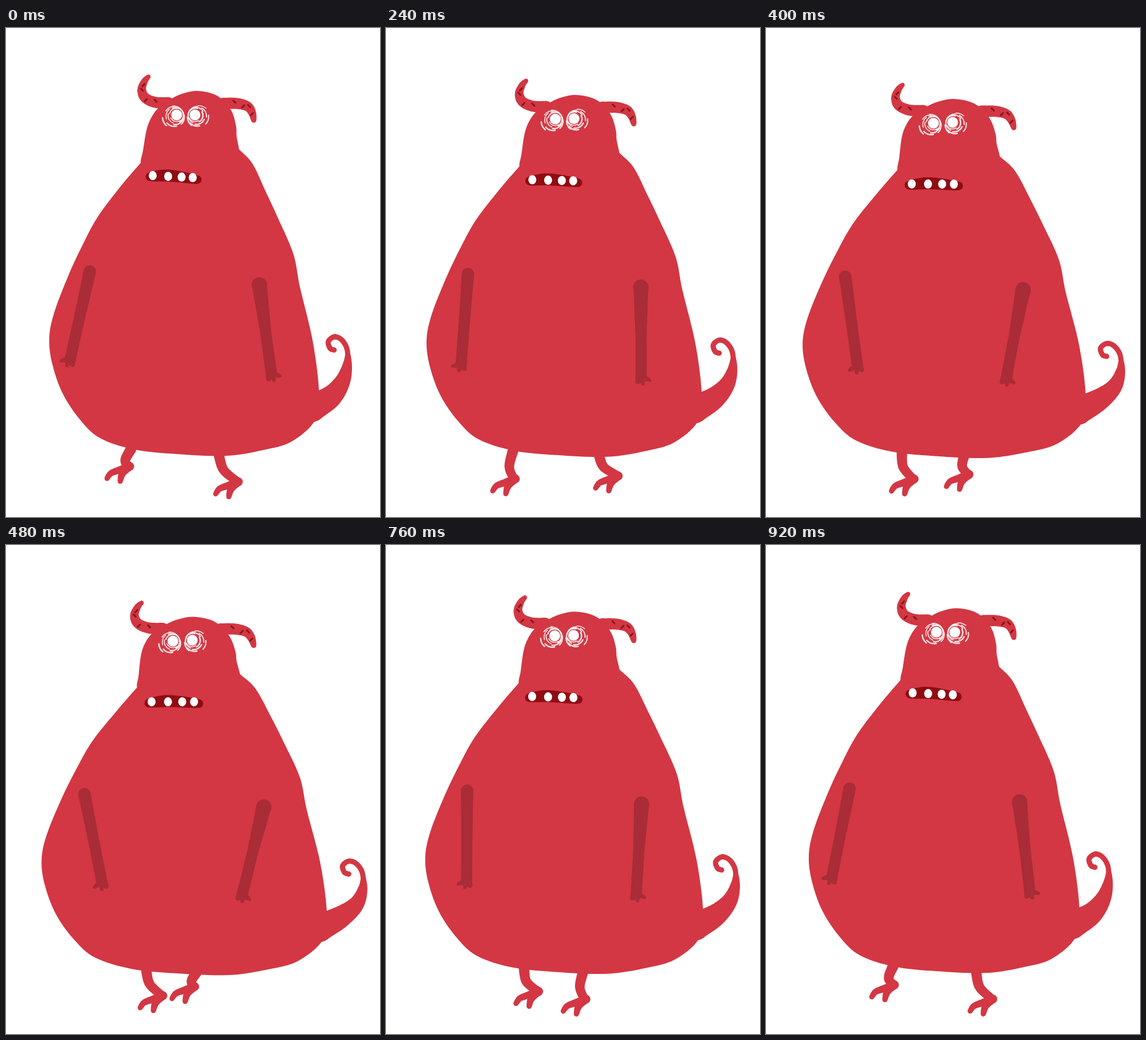
These frames come from a looping animation (655 by 855 pixels, 960 ms). An HTML page with a canvas:

```html
<!DOCTYPE html>
<html lang="en">
<head>
<meta charset="utf-8">
<title>Walking monster</title>
<style>
  html, body { margin: 0; width: 100%; height: 100%; overflow: hidden; background: #fff; }
  canvas { display: block; width: 655px; height: 855px; }
</style>
</head>
<body>
<canvas id="stage" width="655" height="855"></canvas>
<script>
const ctx = document.getElementById('stage').getContext('2d');
const LOOP = 960, STEP = 40, TURN = 2 * Math.PI;
const RED = '#d33743', ARM = '#a92c36', MOUTH = '#8f0c13', MARK = '#86151d';

// Key points of the standing pose
const BODY = [
  [385,188], [408,212], [432,238], [456,289], [476,332], [503,395], [515,455], [537,548],
  [548,638], [541,686], [500,723], [450,738], [385,748], [300,745], [225,737], [165,717],
  [130,685], [100,640], [82,590], [76,545], [84,500], [109,434], [135,378], [161,330],
  [200,278], [236,236], [262,208]
];
const HEAD = [
  [335,110], [362,115], [380,126], [396,147], [403,172], [404,190], [408,212], [410,236],
  [400,262], [320,270], [242,258], [236,236], [240,215], [246,180], [254,158], [268,139],
  [293,122], [312,114]
];
const TAIL = [
  [535,664], [568,645], [588,619], [597,590], [597,563], [588,546], [575,540], [564,548],
  [567,560], [574,563]
];
const LEFT_HORN = [[285,131], [262,130], [244,122], [238,108], [243,93], [250,85]];
const RIGHT_HORN = [[380,132], [405,132], [423,137], [431,148], [434,161]];
const LIPS = [[252,260], [285,258], [335,265]];
const TEETH = [257, 284, 307.5, 327];

const clamp = v => Math.min(1, Math.max(0, v));
const mix = (a, b, u) => a + (b - a) * u;
const cycle = (t, lag) => Math.cos(TURN * (t - lag) / LOOP);
const swell = (t, lag) => (1 - cycle(t, lag)) / 2;

// Soft hump around one moment of the loop
function bump(t, peak) {
  const d = (t - peak + 2.5 * LOOP) % LOOP - LOOP / 2;
  return Math.exp(-((d / 110) ** 2));
}

// Point on a smooth open curve, u from 0 to 1
function along(p, u) {
  const n = p.length - 1, i = Math.min(n - 1, Math.floor(u * n)), f = u * n - i;
  const [a, b, c, d] = [i - 1, i, i + 1, i + 2].map(k => p[Math.max(0, Math.min(n, k))]);
  return [0, 1].map(k => b[k] + f / 2 * (c[k] - a[k]
    + f * (2 * a[k] - 5 * b[k] + 4 * c[k] - d[k] + f * (3 * (b[k] - c[k]) + d[k] - a[k]))));
}

// Rounded stroke whose half width changes with u
function worm(p, color, half) {
  const steps = 24 * (p.length - 1);
  ctx.fillStyle = color;
  ctx.beginPath();
  for (let i = 0; i <= steps; i++) {
    const u = i / steps, [x, y] = along(p, u), r = half(u);
    ctx.moveTo(x + r, y);
    ctx.arc(x, y, r, 0, TURN);
  }
  ctx.fill();
}

// Smooth closed outline
function blob(p, color) {
  const n = p.length, get = i => p[(i + n) % n];
  ctx.fillStyle = color;
  ctx.beginPath();
  ctx.moveTo(...p[0]);
  for (let i = 0; i < n; i++) {
    const a = get(i - 1), b = get(i), c = get(i + 1), d = get(i + 2);
    ctx.bezierCurveTo(b[0] + (c[0] - a[0]) / 6, b[1] + (c[1] - a[1]) / 6,
      c[0] - (d[0] - b[0]) / 6, c[1] - (d[1] - b[1]) / 6, c[0], c[1]);
  }
  ctx.fill();
}

function oval(x, y, rx, ry) {
  ctx.beginPath();
  ctx.ellipse(x, y, rx, ry, 0, 0, TURN);
  ctx.fill();
}

// Both legs share one gait, half a loop apart; the lifted foot trails.
function leg(t, home, reach, ground) {
  const lift = bump(t, LOOP / 2);
  const x = home + reach * cycle(t, 120) - 10 * lift;
  const y = ground - 22 * lift - 12 * bump(t, 200);
  const hip = [mix(home, x, .45), ground - 78], ankle = [x + 13, y - 28];
  const knee = [(hip[0] + ankle[0]) / 2 - 7, (hip[1] + ankle[1]) / 2 + 5];
  const at = (dx, dy) => [x + dx, y + dy];
  worm([hip, knee, ankle], RED, u => 9.5 - 2 * u);
  worm([at(17, -26), at(0, -20), at(-16, -14), at(-23, -5)], RED, u => 7.5 - 3 * u);
  worm([at(15, -26), at(4, -14), at(0, 0)], RED, u => 8.5 - 4 * u);
}

// side: -1 has the thumb on the left, 1 on the right
function arm([x, y], degrees, top, side) {
  ctx.save();
  ctx.translate(x, y);
  ctx.rotate(degrees * TURN / 360);
  ctx.scale(side, 1);
  worm([[0, 0], [0, 80], [0, 157]], ARM, u => mix(top, 10, clamp(u * 2)));
  worm([[2, 157], [15, 163]], ARM, u => 6 - 3.5 * u);
  worm([[2, 160], [3, 169]], ARM, u => 5 - 2 * u);
  worm([[-5, 157], [-6, 165]], ARM, () => 4.5);
  ctx.restore();
}

// Pupil in a scribble of arcs that grows and drifts outwards
function eye([x, y], driftX, driftY) {
  ctx.strokeStyle = 'rgba(255,255,255,.85)';
  for (let i = 0; i < 13; i++) {
    const from = i * 2.4 + 1, span = 1.7 - i * .08;
    ctx.lineWidth = 1.7 + i % 3 * .4;
    ctx.beginPath();
    ctx.arc(x + driftX * i, y + driftY * i, 11.5 + i * .7, from, from + span);
    ctx.stroke();
  }
  ctx.fillStyle = '#fff';
  oval(x, y, 9.5, 9.5);
}

function horn(p, tip) {
  worm(p, RED, u => mix(10, tip, u * u));
  ctx.strokeStyle = MARK;
  ctx.lineWidth = 3;
  for (let i = 0; i < 4; i++) {
    const [x, y] = along(p, .2 + .18 * i), side = i % 2 ? 1 : -1;
    ctx.beginPath();
    ctx.moveTo(x - 2, y + side * 5);
    ctx.lineTo(x + 2, y + side);
    ctx.stroke();
  }
}

function draw(t) {
  const wide = swell(t, 45), low = swell(t, 15);
  // The body sinks and spreads while the head leans left.
  const move = ([x, y]) => [
    x + wide * ((x - 310) * .06 - 9 * clamp((270 - y) / 130)),
    y + low * (15.5 - (y - 110) * .018)
  ];
  const face = p => {
    const [x, y] = move(p);
    return [x + 2 * wide, y + low * (1.5 + (295 - p[0]) * .05)];
  };
  const swing = p => {
    const far = clamp((Math.hypot(p[0] - 545, p[1] - 665) - 25) / 50), [x, y] = move(p);
    return [x + 11 * far * wide, y + 5 * far * low];
  };

  ctx.fillStyle = '#fff';
  ctx.fillRect(0, 0, 655, 855);
  ctx.lineCap = 'round';

  leg(t, 357, 47, 820);
  leg(t + LOOP / 2, 234, 34, 814.5);
  worm(TAIL.map(swing), RED, u => Math.max(4.6, 25 - 50 * u));
  blob(BODY.map(move), RED);
  blob(HEAD.map(move), RED);
  horn(LEFT_HORN.map(move), 3.5);
  horn(RIGHT_HORN.map(move), 4.5);

  arm(move([147, 426]), 13.2 - 25 * wide, 11, -1);
  arm(move([443.5, 449]), -8.2 + 22.5 * wide, 13.5, 1);

  eye(face([299, 152]), -.5, .35);
  eye(face([331, 152]), .55, .3);

  worm(LIPS.map(face), MOUTH, u => 7.5 + 3 * Math.sin(Math.PI * u));
  ctx.fillStyle = '#fff';
  for (const x of TEETH) oval(...face([x, 258 + (x - 257) * .05]), 7, 8);
}

const start = performance.now();
function tick() {
  const t = (performance.now() - start) % LOOP;
  draw(Math.floor(t / STEP) * STEP);
  requestAnimationFrame(tick);
}
tick();
</script>
</body>
</html>
```
